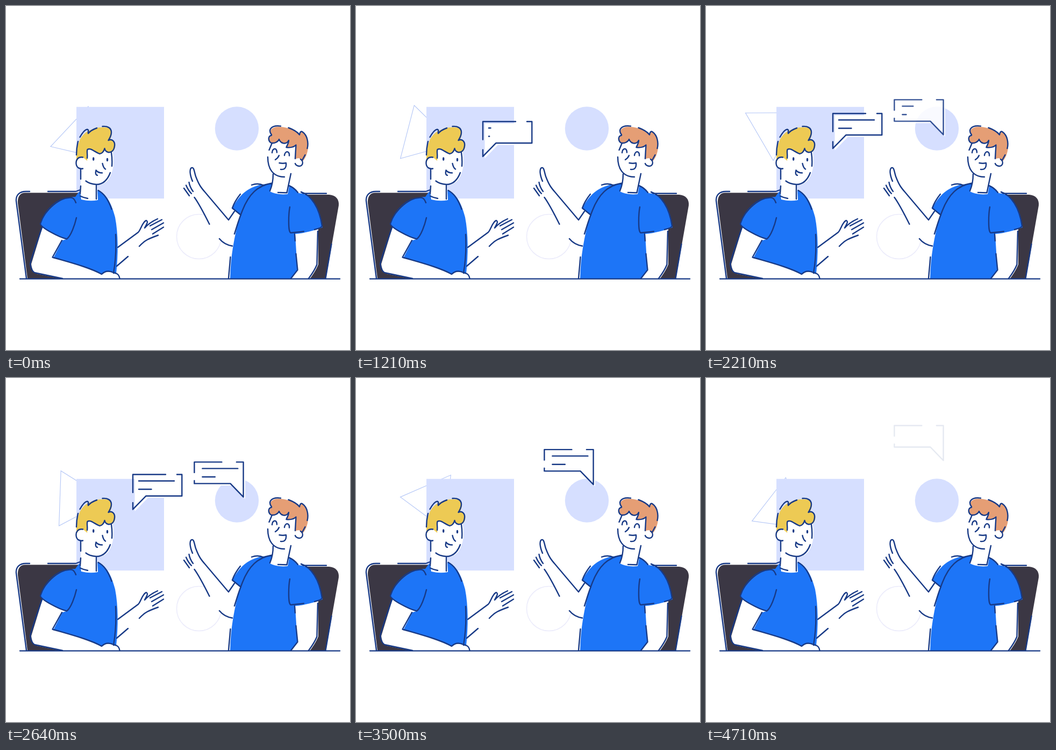
These frames come from a looping animation (640x640 px, 4.78 s). An HTML page:

```html
<!DOCTYPE html>
<html lang="en">
<head>
<meta charset="utf-8">
<title>Conversation</title>
<style>
html, body { margin: 0; width: 100%; height: 100%; overflow: hidden; background: #fff; }
svg { display: block; width: 100%; height: 100%; }
.line { fill: none; stroke: #183a86; stroke-width: 2.4; stroke-linecap: round; stroke-linejoin: round; }
.white { fill: #fff; }
.blue { fill: #1d75f7; }
.dark { fill: #3b3744; }
.pale { fill: #d6dfff; }
.ink { fill: #183a86; }
</style>
</head>
<body>
<svg viewBox="0 0 640 640">
  <path id="tri" fill="none" stroke="#b2c5f6" stroke-width="1.1"/>
  <rect class="pale" x="131" y="187.7" width="163" height="170.5"/>
  <circle class="pale" cx="429.5" cy="228" r="40.7"/>
  <circle cx="359" cy="429" r="41.5" fill="none" stroke="#ebebfb" stroke-width="1.5"/>

  <g id="left">
    <path class="white" d="M0 0H91V40H24.5L0 65Z" transform="translate(3.6 3.6)"/>
    <path class="line" d="M61 0H0V33.5M0 52.5V65L24.5 40H91.3V0H82"/>
    <path class="line text"/>
  </g>
  <g id="right">
    <path class="white" d="M0 0H91V65L67 40H0Z" transform="translate(3.6 3.6)"/>
    <path class="line" d="M51 0H0V19.5M0 34.5V40H67L91.2 65V0H78.5"/>
    <path class="line text"/>
  </g>

  <!-- left person -->
  <path class="dark" d="M36 347.5H140V440L100 507.5H40L22 367C21 355 26 347.5 36 347.5Z"/>
  <path class="white" d="M69 408L47 480C48 489 51 496 57 498L106 508H212C211 502 208 498 203 497L180 480L120 430Z"/>
  <path class="blue" d="M139 343C134 347 131 352 129 355C101 355 73 380 64 406C67 414 98 430 112 434L105 436L88 469C118 476 154 487 178 499C184 493 192 493 202 498L205 498C209 462 209 424 203 393C197 369 187 349 172 343Z"/>
  <path class="white" d="M139 290V353L140 360Q156 364 171 361L169 325Z"/>
  <path class="white" d="M151 262L198 268C201 285 201 300 196 312C191 327 181 333 170 332C158 331 149 327 142 318L139 302C127 301 127 283 140 281Z"/>
  <path fill="#edca54" d="M131 286C131 266 134 246 149 235C161 227 176 224 188 226C198 229 199 240 193 249C203 249 206 261 201 268C197 275 188 274 184 267C182 272 179 275 174 275C164 271 158 263 152 268C150 273 152 280 151 288L144 282C138 281 134 284 132 289Z"/>
  <ellipse class="ink" cx="162.7" cy="284.6" rx="1.7" ry="3.3"/>
  <ellipse class="ink" cx="188.5" cy="286" rx="1.7" ry="3.3"/>
  <path class="line" d="M44 345H37C25 345 18 352 19 363L38 507M78 345H130L138 342
    M131 277Q131 264 134 252M137.5 244C142 236 147 230 151 229.5C155 230 152 234 153 237C157 232 162 229.5 169 227
    M179.5 224C189 223 196 227 196 235C196 242 192 247 190.5 250C198 246 203 253 202 260C201 270 195 273 190 272C186 271 184 268 183.5 265C182 271 178 275 174 275C164 271 157 263 151.5 267C150 271 152 277 151 283
    M143 281.5C134 280 130 286 130.5 293C131 301 137 303.5 143 302.5
    M196 273Q198 285 197 298M194 310C188 326 178 332 168 332C160 331.5 154 330 148.500 325.500
    M179.500 293Q181 301 185 303.500M167.500 305.500Q171 310.500 179 310.500M167.500 305.500C166 311 167 315 170 315
    M139 303V322M139 335L138 349M168 332V359M138 353.500Q145 357 152 358
    M130 366C127 358 124 356 119 356.500C94 358 72 380 64 405C64 412 98 430 113 433.500C121 428 128 407 131 394
    M171.500 343C183 349 191 362 196.500 378M204 425C205.500 455 203 480 200 497
    M104 436L86.500 467.500C115 476 155 486 178 499C184 493 192 492 200 496L205 497.500C209 499 211 503 211.500 507
    M67 412C59 435 50 460 45 480C46 489 50 495.500 55 496.500L105 507
    M208 449L246 421C251 416 254 401 261 399C266 401 260 408 258 413C265 405 273 400 282 396M268 409L290 397.500M271 416L293 403.500M273 424L293 411.500M248 447C258 436 265 433 283 426.500M206 484L227 466"/>

  <!-- right person -->
  <path class="dark" d="M540 351H601C614 352 620 360 619 371L595 507.500H560L576 400Z"/>
  <path class="white" d="M536 415H581V481C577 491 571 500 565 508H531L542 490Z"/>
  <path class="white" d="M343 302C350 297 351 310 355 321C362 338 366 341 371 347L414 398L437 385L425 447C411 446 402 440 397 433L379 407C370 389 360 369 350 356L332 339L346 327Z"/>
  <path class="blue" d="M493 331C467 330 448 341 437 353C428 363 424 370 421 377L436 389C424 430 418 465 417 507.500H531L542 490L538 424C555 423 575 417 589 412C585 378 572 355 551 349L544 348C539 341 534 337 527 333Z"/>
  <path class="white" d="M497 305C497 322 495 336 491 345Q505 352 524 350L532 308Z"/>
  <path class="white" d="M494 254L540 257L540 284C549 280 555 288 551 295C547 300 541 298 538 296C535 309 529 318 518 319C495 319 488 300 488 281Z"/>
  <path fill="#e59e75" d="M512 225C502 223 493 227 492 233C492 238 496 240 495 241C489 243 488 250 493 254C499 257 506 254 508 249C512 255 519 260 526 251C526 256 523 260 522 263C529 264 536 262 540 258L538 285C545 281 549 284 551 290C559 282 563 268 562 255C560 243 556 235 550 234L546 240C538 231 525 226 512 225Z"/>
  <path class="line" d="M549 346L553 348.700H596M605.500 443L594.500 507
    M511 223.500C502 222 492 224 491 232C491 238 495 239 494 240.500C488 242 487 249 492 254C498 257 506 253 508 248C511 256 521 259 526 250C526 255 523 259 521.500 263C529 264 536 262 539.500 258.500L538 284
    M525.500 226.500C535 230 541 233 546 239.500C547 234 549 232 552 234.500C561 241 563 255 560.500 265M556.500 277L551 287
    M538 293C540 298 548 300 551 295C553 291 551 287 548 285
    M494.500 256L489.500 268M487 281C487 302 496 318 518 318
    M495 273C496 264 504 263 504 272.500M518 278C519 269 528 269 527 278.500M508 278Q506 283 501 286
    M508.500 292Q515 293.500 521 292C522 300 519 305 511 304
    M497 312C497 322 495 335 491 344M530 312L522.500 347.500L506 347
    M457 333C465 330 474 331 480 334M436 350C428 360 424 367 421 376L437 389
    M495 329.500C468 334 452 350 440 380C432 400 429 412 425 424M417.500 467L414 507
    M527 334.500C534 337 539 342 543 347M549 346C568 352 583 375 588 409C588 412 582 414 574 416
    M554 419.500L530 422C527 421 526 415 526 400Q526 385 528 374M537 424L538 437M539.500 461L542.500 491L530 507
    M580 419L578.500 481C575 490 569 499 563 507
    M347 326C342 314 341 304 345 301C350 299 350 308 353 317C359 333 363 338 370 346L414 398L425 382
    M331 339L341 353M335 333.500Q339 343 345 349M340.500 328Q342 337 348 345
    M350.500 356C360 369 370 389 378.500 406M397 433Q406 444 421 446.500"/>
  <path class="line" d="M26 507.600H621"/>
</svg>
<script>
const LOOP = 4780, FRAMES = 67;
const clamp = x => Math.min(1, Math.max(0, x));
const ramp = (t, a, b) => clamp((t - a) / (b - a));
const ease = u => u * u * (3 - 2 * u);
const $ = s => document.querySelector(s);

// Monotone cubic through [time, value] keys
function curve(keys) {
  const n = keys.length;
  const slope = keys.slice(1).map((k, i) => (k[1] - keys[i][1]) / (k[0] - keys[i][0]));
  const tan = keys.map((_, i) => {
    if (i === 0) return slope[0];
    if (i === n - 1) return 0;
    const a = slope[i - 1], b = slope[i];
    return a * b > 0 ? 2 * a * b / (a + b) : 0;
  });
  return t => {
    if (t <= keys[0][0]) return keys[0][1];
    if (t >= keys[n - 1][0]) return keys[n - 1][1];
    let i = 0;
    while (t > keys[i + 1][0]) i++;
    const [t0, y0] = keys[i], [t1, y1] = keys[i + 1];
    const d = t1 - t0, u = (t - t0) / d, e = ease(u), v = 1 - u;
    return y0 * (1 - e) + y1 * e + d * u * v * (v * tan[i] - u * tan[i + 1]);
  };
}

const bubbles = [
  { el: $('#left'), x: 236, pad: 11, fadeIn: [400, 1050], fadeOut: [2930, 3340],
    write: 1115, wipe: 2790,
    y: curve([[400, 270.5], [570, 260], [1210, 215], [2210, 200], [3070, 153], [3430, 136]]) },
  { el: $('#right'), x: 350.4, pad: 15, fadeIn: [1650, 2300], fadeOut: [4360, 4750],
    write: 1956, wipe: 3650,
    y: curve([[1700, 235.5], [2210, 174.5], [2290, 169.5], [2860, 151.2], [3070, 149],
      [3430, 136], [4000, 108.8], [4570, 88.5]]) }
];

function drawBubble(b, t) {
  b.el.setAttribute('transform', `translate(${b.x} ${b.y(t)})`);
  b.el.setAttribute('opacity', ramp(t, ...b.fadeIn) * (1 - ramp(t, ...b.fadeOut)));
  const end = ease(ramp(t, b.write, b.write + 700));
  const start = ease(ramp(t, b.wipe, b.wipe + 700));
  const row = (y, w) => `M${b.pad + w * start} ${y}H${b.pad + w * end}`;
  b.el.querySelector('.text').setAttribute('d',
    end - start > 0.01 ? row(12, 66) + row(27.6, 23.5) : '');
}

function drawTriangle(t) {
  const turn = 360 * t / LOOP;
  const polar = (r, deg) => [r * Math.cos(deg * Math.PI / 180), r * Math.sin(deg * Math.PI / 180)];
  const [cx, cy] = polar(11, 54.3 + turn);
  const pts = [43.2, 163.2, 283.2].map(a => {
    const [x, y] = polar(59.1, a + turn);
    return `${133.1 + cx + x} ${235.5 + cy + y}`;
  });
  $('#tri').setAttribute('d', `M${pts.join('L')}Z`);
}

function render(ms) {
  // 14 poses a second
  const step = LOOP / FRAMES;
  const t = Math.floor((ms % LOOP + 5) / step) % FRAMES * step;
  drawTriangle(t);
  bubbles.forEach(b => drawBubble(b, t));
}

const begin = performance.now();
function tick() {
  render(performance.now() - begin);
  requestAnimationFrame(tick);
}
tick();
</script>
</body>
</html>
```
